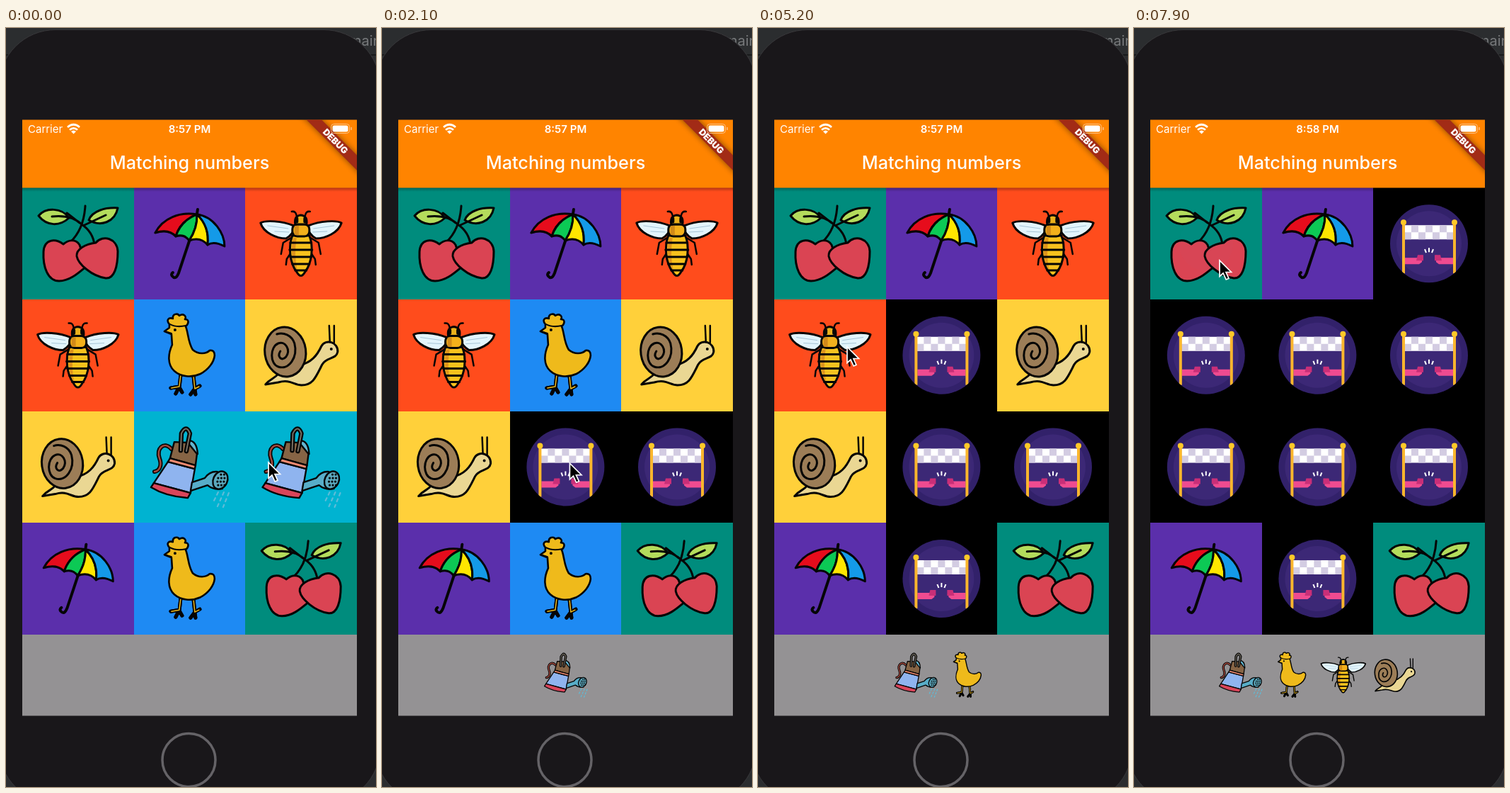
Write an HTML page that moves like this. It is 523x1071 px and loops after 8 s.

```html
<!DOCTYPE html>
<html lang="en">
<head>
<meta charset="utf-8">
<title>Matching numbers</title>
<style>
  html, body { margin: 0; width: 100%; height: 100%; overflow: hidden; background: #2b2d2f; }
  #stage { display: block; }
  text { font-family: Inter, sans-serif; fill: #fff; }
  .ink { stroke: #050505; stroke-width: 3; stroke-linejoin: round; stroke-linecap: round; }
  .line { fill: none; }
</style>
</head>
<body>
<svg id="stage" width="523" height="1071" viewBox="0 0 523 1071">
  <defs>
    <linearGradient id="shade" x2="0" y2="1">
      <stop stop-opacity=".32"/><stop offset="1" stop-opacity="0"/>
    </linearGradient>
    <filter id="soft" x="-20%" y="-100%" width="140%" height="300%"><feGaussianBlur stdDeviation="4"/></filter>
    <clipPath id="disc"><circle r="55"/></clipPath>

    <g id="cherry" class="ink" transform="translate(-101.8 -304.2)">
      <g fill="#b4dc5c">
        <path d="M46 265C56 253 79 253 89 268C76 280 58 280 46 265"/>
        <path d="M158 254C140 253 122 258 117 271C134 281 154 274 158 254"/>
      </g>
      <path class="line" d="M65 266Q92 263 107 277Q123 288 125 306M112 251Q110 284 91 302M86 261L104 275M141 264L111 278"/>
      <g fill="#da4453">
        <path d="M81 305C70 297 54 297 53 316C52 337 59 357 75 357C90 357 102 346 114 336L104 306C98 297 88 299 81 305"/>
        <path d="M127 303C112 305 99 312 100 322C102 333 121 350 141 353C153 354 158 337 158 315C157 297 137 291 127 303"/>
      </g>
    </g>

    <g id="umbrella" class="ink" transform="translate(-259.5 -304.2)">
      <path class="line" stroke-width="4" d="M260 298L244 346Q240 356 235 350Q233 347 236 345M270 263L271 256"/>
      <path fill="#e60c1c" d="M270 263C246 259 222 268 211 289Q230 283 240 294Q247 272 270 263"/>
      <path fill="#0cc955" d="M270 263Q247 272 240 294Q252 290 259 300Q271 282 270 263"/>
      <path fill="#ffe600" d="M270 263Q271 282 259 300Q275 294 285 306Q288 280 270 263"/>
      <path fill="#149ae8" d="M270 263Q288 280 285 306Q294 300 309 308C309 290 294 266 270 263"/>
    </g>

    <g id="bee" class="ink" transform="translate(-417.2 -304.2)">
      <path class="line" stroke-width="2.5" d="M411 265Q410 258 404 259M423 265Q424 258 430 259M405 295L392 303L389 319M429 295L442 303L445 319M403 317L397 326L396 334M431 317L437 326L438 334"/>
      <g fill="#e3f5fc">
        <path id="wing" d="M407 279C390 272 367 271 360 275C364 289 383 297 396 297C403 293 407 287 408 281"/>
        <use href="#wing" transform="matrix(-1 0 0 1 834.4 0)"/>
      </g>
      <path class="line" style="stroke:#a7c5d6;stroke-width:1" d="M370 279L399 283M380 287L400 288M464 279L435 283M454 287L434 288"/>
      <path fill="#f8c21d" d="M405 293C399 308 401 331 411 344Q417 355 423 344C433 331 435 308 429 293Z"/>
      <path style="stroke:none" fill="#df951c" d="M406 296C402 312 404 330 412 343Q407 320 411 296Z"/>
      <path class="line" d="M402 303H432M401 313H433M402 323H432M405 333H429M409 342H425"/>
      <rect x="405" y="277" width="24" height="17" rx="7" fill="#f3b01b"/>
      <path style="stroke:none" fill="#d28a18" d="M408 279H414V292H408Z"/>
      <path fill="#eab01b" d="M409 277Q407 265 417 264Q427 265 425 277Z"/>
      <path stroke-width="5" d="M411 269V273M423 269V273"/>
    </g>

    <g id="hen" class="ink" transform="translate(-259.5 -461.8)">
      <g class="line">
        <path id="legs" style="stroke-width:5" d="M247 490L245 508M233 508L245 506L240 516M245 507L249 514M265 490L267 509M274 505L267 509L261 517M267 509L268 517"/>
        <use href="#legs"/>
        <path style="stroke:#efba1b;stroke-width:1.500" d="M247 490L245 506L234 508M265 490L267 509L273 506"/>
      </g>
      <path fill="#efba1b" style="stroke-width:2.600" d="M231 418C226 412 230 408 236 410C235 403 243 402 245 406C251 402 256 407 253 411C260 411 258 418 254 421C258 430 257 443 264 454C272 461 283 460 288 455Q295 454 295 462C294 472 286 482 275 488C262 494 247 492 238 484C228 475 229 460 235 447L234 432L224 428L231 423Z"/>
      <path class="line" style="stroke-width:2" d="M232 418Q241 423 254 420M225 428L234 431"/>
      <circle cx="239" cy="426" r="1" style="stroke-width:2"/>
    </g>

    <g id="snail" class="ink" transform="translate(-417.2 -461.8)">
      <path fill="#ead793" d="M367 503C373 495 380 495 385 488L415 476C432 472 440 462 446 449C452 438 470 443 469 457C467 468 453 464 447 475C438 493 434 504 418 504C407 504 402 495 385 500Z"/>
      <path class="line" style="stroke-width:2.500" d="M458 443L457 420M464 444V420"/>
      <ellipse cx="395" cy="457" rx="29" ry="35" transform="rotate(-8 395 457)" fill="#9c7d57"/>
      <path class="line" d="M388 456C383 464 390 471 396 464C403 454 395 441 385 445C373 450 373 474 385 478C400 483 413 465 408 445C404 433 392 429 383 432"/>
      <circle cx="460" cy="453" r="1" style="stroke-width:2"/>
    </g>

    <g id="can" class="ink" transform="translate(-259.5 -619.3)">
      <path class="line" style="stroke-width:6" d="M234 594C223 582 212 594 217 607C221 617 217 625 210 626"/>
      <path class="line" style="stroke:#a5483d;stroke-width:2.500" d="M234 594C223 582 212 594 217 607C221 617 217 625 210 626"/>
      <g style="stroke-width:2.400">
        <path fill="#63b6d0" d="M258 582Q270 582 271 601L259 602Z"/>
        <path fill="#866445" d="M238 584L232 607L268 617L270 601L257 585Z"/>
        <path fill="#8fb4ef" d="M229 612L267 622L261 656L209 642Z"/>
        <path fill="#f08a70" d="M232 607L268 617L267 622L229 612Z"/>
        <path fill="#d9455a" d="M209 642L261 656L257 663Q226 661 205 648Z"/>
        <path fill="#58adc8" d="M263 641L281 635Q288 625 299 626L306 650Q293 652 285 645L261 653Z"/>
        <ellipse cx="303" cy="638" rx="10" ry="13" transform="rotate(25 303 638)" fill="#5ba8bd"/>
      </g>
      <path class="line" style="stroke-width:6.500" d="M247 596L248 572Q255 559 260 572L255 597"/>
      <path class="line" style="stroke:#777064;stroke-width:2" d="M247 596L248 572Q255 559 260 572L255 597"/>
      <path class="line" style="stroke-width:3.200;stroke-dasharray:0 4.500" d="M304 630H312M300 635H313M299 640H312M300 645H310"/>
      <path class="line" style="stroke:#5fbcd8;stroke-width:2.200;stroke-dasharray:4 5" d="M300 655L292 671M308 655L299 675M315 656L307 676"/>
    </g>

    <g id="finish">
      <circle r="55" fill="#32216a"/><circle r="46" fill="#3c2876"/>
      <g clip-path="url(#disc)">
        <path fill="#fff" d="M-35-26H35V-6H-35Z"/>
        <path stroke="#d3cce2" stroke-width="10" stroke-dasharray="10" d="M-25-21H35M-35-11H35"/>
        <path fill="#ef4b90" d="M-34 20H-16L-10 16V26L-14 29H-34ZM34 20H16L10 16V26L14 29H34Z"/>
        <path fill="#c92f78" d="M-16 16H-8V24H-18ZM16 16H8V24H18Z"/>
        <path stroke="#fff" stroke-width="2" d="M0 6V12M-6 8L-4 13M6 8L4 13"/>
        <path stroke="#fbb62d" stroke-width="4" d="M-36-30V42M36-30V42"/>
      </g>
      <g fill="#ffc928"><circle cx="-36" cy="-30" r="4"/><circle cx="36" cy="-30" r="4"/></g>
    </g>
  </defs>

  <rect width="523" height="1071" fill="#2b2d2f"/>
  <path stroke="#191a1b" stroke-width="2" d="M0 38H523"/>
  <text x="485" y="25" font-size="20" style="fill:#77797b">main</text>
  <rect x="-10" y="2.500" width="539" height="1092" rx="80" fill="#19171a" stroke="#39383b"/>
  <circle cx="258.500" cy="1033" r="37.500" fill="none" stroke="#656367" stroke-width="3.500"/>

  <rect x="23" y="850" width="473" height="120.500" fill="#949294"/>
  <g id="board"></g>
  <g id="tray"></g>

  <rect x="23" y="225" width="473" height="6" fill="url(#shade)"/>
  <rect x="23" y="129.500" width="473" height="96" fill="#ff8400"/>
  <text x="31" y="148" font-size="15">Carrier</text>
  <g fill="none" stroke="#fff" stroke-width="2.800">
    <path d="M87 140Q95.500 132.500 104 140M90 143.800Q95.500 139 101 143.800"/>
    <path fill="#fff" stroke="none" d="M92 146Q95.500 143 99 146L95.500 149.500Z"/>
  </g>
  <text id="clock" x="259.500" y="148" font-size="15" font-weight="600" text-anchor="middle"></text>
  <text x="259.500" y="199" font-size="25.200" font-weight="500" text-anchor="middle">Matching numbers</text>

  <svg x="396" y="129.500" width="100" height="96">
    <g transform="translate(100 0) rotate(45)">
      <rect x="-70" y="35.300" width="140" height="15.100" opacity=".5" filter="url(#soft)"/>
      <rect x="-70" y="35.300" width="140" height="15.100" fill="#a22b16"/>
      <text y="47.400" font-size="12.700" font-weight="900" text-anchor="middle">DEBUG</text>
    </g>
  </svg>
  <rect x="459.500" y="135.500" width="26" height="13" rx="4" fill="none" stroke="#ffc083"/>
  <rect x="461.500" y="137.500" width="22" height="9" rx="2.500" fill="#fff"/>
  <path stroke="#ffc083" stroke-width="1.500" d="M488 140V144"/>

  <path id="cursor" d="M0 0V22.500L5 18L9.200 27L13 25.400L9 16.500H16.500Z" fill="#000" stroke="#fff" stroke-width="1.700"/>
</svg>
<script>
const LOOP = 8000, STEP = 100, TILE = 157.6;
const $ = id => document.getElementById(id);

const colors = { cherry: '#008c7d', umbrella: '#5b2fab', bee: '#ff4c1c',
                 hen: '#1e8af3', snail: '#ffd03a', can: '#00b3d1' };
const cards = 'cherry umbrella bee bee hen snail snail can can umbrella hen cherry'.split(' ');

// [time, card]; every second tap completes a pair
const taps = [[300, 8], [1150, 7], [3450, 10], [3980, 4], [5180, 3], [5750, 2], [6280, 5], [6900, 6], [7880, 0]];
const matches = taps.filter((_, i) => i % 2).map(([time, card]) => ({ time, kind: cards[card] }));

// time, x, y of the pointer tip
const path = [[0, 371, 613], [500, 371, 613], [1150, 272, 615], [1800, 272, 615], [2900, 236, 611],
  [3400, 258, 770], [3500, 258, 770], [3950, 294, 459], [4200, 294, 459], [5000, 126, 450], [5250, 126, 450],
  [5700, 418, 310], [5800, 418, 310], [6200, 394, 469], [6400, 394, 469], [6850, 105, 620],
  [7000, 105, 620], [7700, 121, 328], [8000, 121, 328]];

// Tile edges sit on whole pixels so that neighbours meet without a seam.
const left = c => Math.round(23 + c * TILE), top_ = r => Math.round(225.4 + r * TILE);
$('board').innerHTML = cards.map((kind, i) => {
  const c = i % 3, r = Math.floor(i / 3), x = left(c), y = top_(r);
  const center = [23 + (c + .5) * TILE - x, 225.4 + (r + .5) * TILE - y];
  return `<svg x="${x}" y="${y}" width="${left(c + 1) - x}" height="${top_(r + 1) - y}">
    <rect width="100%" height="100%"/>
    <use transform="translate(${center})"/>
    <circle cx="${center[0]}" cy="${center[1]}" fill="#40a8ff"/>
  </svg>`;
}).join('');
const tiles = [...$('board').children].map(svg => [...svg.children]);

$('tray').innerHTML = matches.map(m => `<use href="#${m.kind}"/>`).join('');
const prizes = [...$('tray').children];

function pointerAt(t) {
  const i = path.findIndex(p => p[0] > t), a = path[i - 1], b = path[i];
  const u = (t - a[0]) / (b[0] - a[0]), e = u * u * (3 - 2 * u);
  return [1, 2].map(k => a[k] + (b[k] - a[k]) * e);
}

function draw(t) {
  const done = matches.filter(m => m.time <= t);
  tiles.forEach(([back, art, ripple], i) => {
    const kind = cards[i], matched = done.some(m => m.kind === kind);
    back.setAttribute('fill', matched ? '#000' : colors[kind]);
    art.setAttribute('href', matched ? '#finish' : '#' + kind);
    const tap = taps.find(([, card]) => card === i), age = tap ? t - tap[0] : -1;
    const alive = age >= 0 && age < 800;
    ripple.setAttribute('r', alive ? 33 + age * .28 : 0);
    ripple.setAttribute('opacity', alive ? .1 * Math.min(1, age / 150) * (1 - age / 800) : 0);
  });
  prizes.forEach((prize, i) => {
    const x = 259.5 + 72.7 * (i - (done.length - 1) / 2);
    prize.setAttribute('transform', `translate(${x} 913) scale(.55)`);
    prize.style.display = i < done.length ? '' : 'none';
  });
  $('clock').textContent = t < 7100 ? '8:57 PM' : '8:58 PM';
  $('cursor').setAttribute('transform', `translate(${pointerAt(t)})`);
}

function frame(now) {
  draw(Math.floor(now % LOOP / STEP) * STEP);
  requestAnimationFrame(frame);
}
requestAnimationFrame(frame);
</script>
</body>
</html>
```
